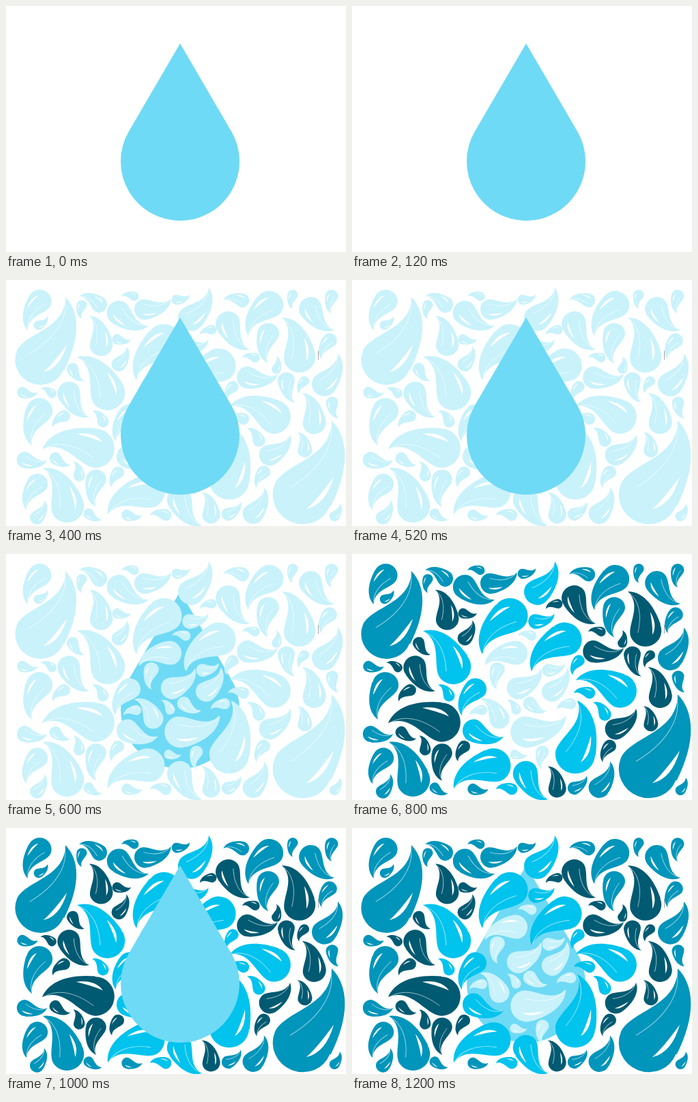
An HTML page with a canvas that plays this animation: 498 px wide and 361 px high, repeating every 1.4 s.

```html
<!DOCTYPE html>
<html lang="en">
<head>
<meta charset="utf-8">
<title>Drops</title>
<style>
  html, body { margin: 0; width: 100%; height: 100%; overflow: hidden; background: #fff; }
  canvas { display: block; width: 498px; height: 361px; }
</style>
</head>
<body>
<canvas id="stage" width="498" height="361"></canvas>
<script>
const ctx = document.getElementById('stage').getContext('2d');
const W = 498, H = 361, STEP = 200, CELL = 3;
const PALE = '#c9f2fb', BRIGHT = '#00c3ee', DARK = '#005a72', MID = '#0095bb', BIG = '#6fdaf5';

// Large drops: tip, then body centre; everything else follows from these
const anchors = [
  [87,25, 50,118], [477,206, 434,316], [53,248, 131,247], [54,276, 90,332],
  [104,113, 149,166], [191,147, 232,90], [263,172, 312,125], [328,185, 393,201],
  [149,344, 208,310], [287,360, 254,322], [330,215, 327,294], [404,55, 430,113],
  [355,82, 386,36], [481,73, 446,42], [357,102, 325,64], [209,67, 165,48],
  [122,201, 92,166], [398,138, 354,143], [38,243, 49,192], [486,108, 466,153],
  [297,11, 271,56], [222,268, 178,259], [161,237, 181,198], [416,227, 386,257],
  [277,168, 243,197], [315,167, 293,202], [188,213, 216,242]
];

// Colour zones spread outwards from the middle
function colorAt(x, y) {
  const dx = x - 257, dy = y - 205;
  if (Math.hypot(dx / 74, dy / 107) < 1) return PALE;
  if (Math.abs(dx) + .85 * Math.abs(dy) < 147) return BRIGHT;
  return Math.hypot((x - 260) / 209, (y - 200) / 150) < 1 ? DARK : MID;
}

function makeDrop(tx, ty, x, y) {
  const len = Math.hypot(tx - x, ty - y);
  return { x, y, len, r: len / 2.8, angle: Math.atan2(ty - y, tx - x), color: colorAt(x, y) };
}

// Free distance around each grid point
const cols = Math.ceil(W / CELL), rows = Math.ceil(H / CELL);
const room = Array.from({ length: cols * rows }, (_, i) => {
  const x = i % cols * CELL, y = Math.floor(i / cols) * CELL;
  return Math.min(x - 14, 496 - x, y - 12, 360 - y);
});

function roomAt(x, y) {
  const c = Math.round(x / CELL), r = Math.round(y / CELL);
  return c < 0 || r < 0 || c >= cols || r >= rows ? -1 : room[r * cols + c];
}

// A drop takes up a row of circles that shrink towards its tip
function occupy({ x, y, len, r, angle }) {
  const ux = Math.cos(angle), uy = Math.sin(angle);
  for (let t = 0; t <= 1; t += .125) {
    const along = t * len, side = .45 * r * Math.sin(Math.PI * t);
    const cx = x + ux * along - uy * side, cy = y + uy * along + ux * side;
    const size = r * (1 - t) ** .8;
    for (let i = 0; i < room.length; i++) {
      const px = i % cols * CELL, py = Math.floor(i / cols) * CELL;
      room[i] = Math.min(room[i], Math.hypot(px - cx, py - cy) - size);
    }
  }
}

// Fill the widest gap with a drop lying along its open side
function fillGap() {
  let best = 0;
  room.forEach((gap, i) => { if (gap > room[best]) best = i; });
  const gap = room[best];
  if (gap < 8.5) return null;
  const x = best % cols * CELL, y = Math.floor(best / cols) * CELL;
  let ux = 1, uy = 0, most = -Infinity;
  for (let k = 0; k < 16; k++) {
    const a = k * Math.PI / 8, cx = Math.cos(a), cy = Math.sin(a);
    const free = roomAt(x + cx * gap * 1.3, y + cy * gap * 1.3);
    if (free > most) [most, ux, uy] = [free, cx, cy];
  }
  return makeDrop(x + ux * gap * 1.15, y + uy * gap * 1.15, x - ux * gap * .4, y - uy * gap * .4);
}

const drops = anchors.map(a => makeDrop(...a));
drops.forEach(occupy);
for (let d; drops.length < 85 && (d = fillGap());) {
  drops.push(d);
  occupy(d);
}

function paisley({ x, y, len, r, angle }, color) {
  ctx.save();
  ctx.translate(x, y);
  ctx.rotate(angle);

  ctx.fillStyle = color;
  ctx.beginPath();
  ctx.moveTo(len, 0);
  ctx.bezierCurveTo(len * .88, r * .75, len * .55, r * 1.2, 0, r * 1.06);
  ctx.ellipse(0, 0, r, r * 1.03, 0, Math.PI / 2, Math.PI * 1.5);
  ctx.bezierCurveTo(len * .3, -r, len * .55, r * .5, len, 0);
  ctx.fill();

  if (r > 9) {
    ctx.strokeStyle = 'rgba(255,255,255,.65)';
    ctx.lineWidth = .9;
    ctx.beginPath();
    ctx.moveTo(len * .97, 0);
    ctx.bezierCurveTo(len * .75, r * .4, len * .4, r * .3, r * .1, -r * .5);
    ctx.stroke();
  }

  // Crescent highlight
  ctx.fillStyle = '#fff';
  ctx.beginPath();
  ctx.moveTo(r, r * .78);
  ctx.quadraticCurveTo(0, r * .88, -r * .4, r * .3);
  ctx.quadraticCurveTo(0, r * .52, r, r * .78);
  ctx.fill();
  ctx.restore();
}

function pattern(colored) {
  for (const d of drops) paisley(d, colored ? d.color : PALE);
  ctx.fillStyle = '#a5a5a5';
  ctx.fillRect(457, 104, 1, 13);
}

function bigDrop() {
  ctx.fillStyle = BIG;
  ctx.beginPath();
  ctx.moveTo(255, 55);
  ctx.arc(255, 228, 87, -Math.PI / 6, Math.PI * 7 / 6);
  ctx.fill();
}

const pale = () => pattern(false);
const vivid = () => pattern(true);
const scenes = [
  [bigDrop],
  [pale], [pale, bigDrop], [bigDrop, pale],
  [vivid], [vivid, bigDrop], [bigDrop, vivid]
];

let shown = -1;
const start = performance.now();

function frame() {
  const t = Math.max(0, performance.now() - start);
  const i = Math.floor(t / STEP) % scenes.length;
  if (i !== shown) {
    shown = i;
    ctx.fillStyle = '#fff';
    ctx.fillRect(0, 0, W, H);
    scenes[i].forEach(draw => draw());
  }
  requestAnimationFrame(frame);
}
frame();
</script>
</body>
</html>
```
